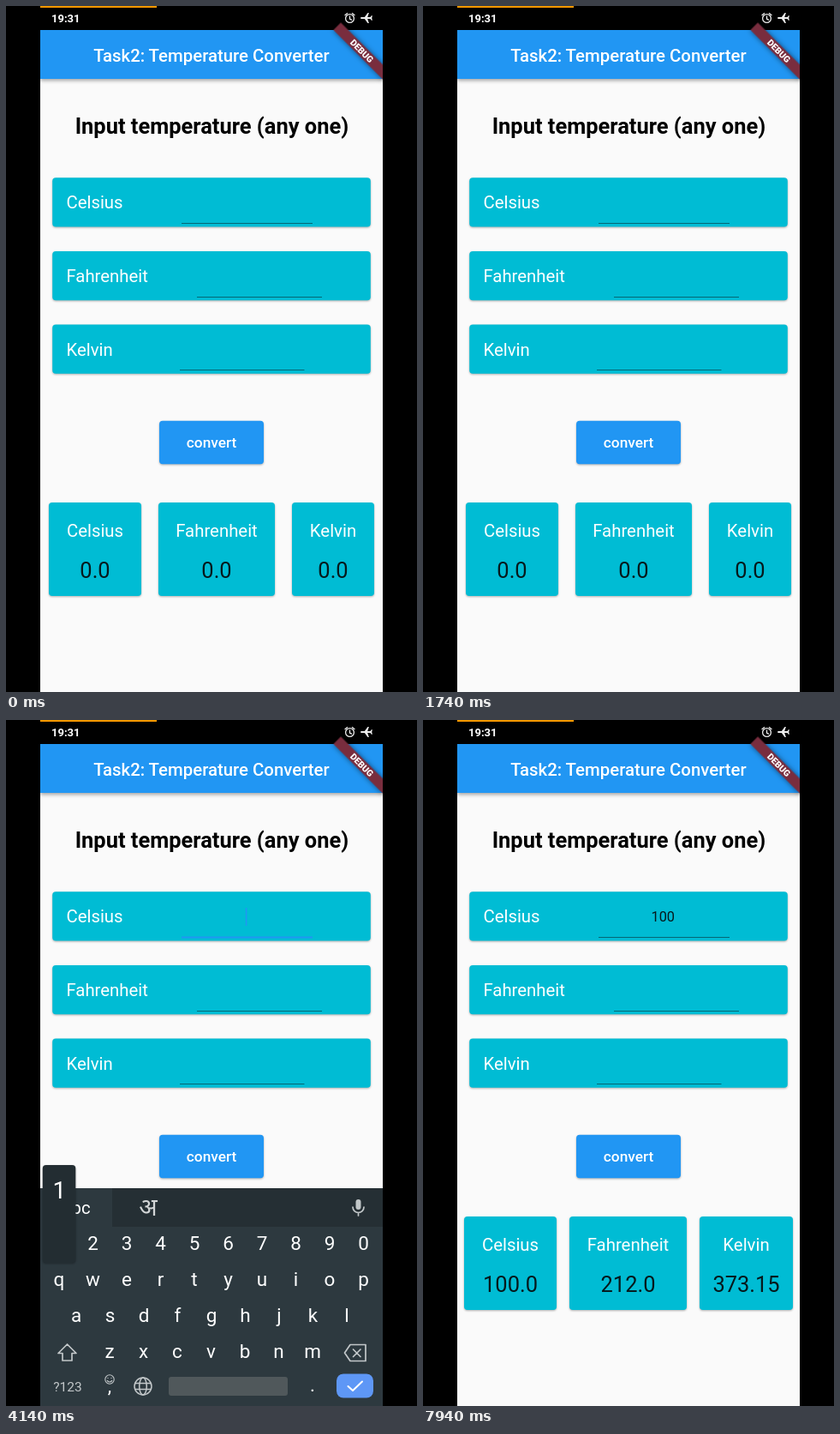
An HTML page that plays this animation: 480x800 px, repeating every 7.99 s.

```html
<!DOCTYPE html>
<html lang="en">
<head>
<meta charset="utf-8">
<title>Temperature Converter</title>
<style>
  html, body { margin: 0; width: 100%; height: 100%; overflow: hidden; background: #000; }
  svg { display: block; width: 480px; height: 800px; font-family: Roboto, sans-serif; }
  text { fill: #fff; white-space: pre; }
  .mid { text-anchor: middle; }
  .label { font-size: 20.36px; }
  .value { font-size: 25.45px; fill: #06191c; }
  .card { fill: #00bcd4; }
  .raised { filter: drop-shadow(0 1px .8px rgba(0, 0, 0, .3)); }
  .key { font-size: 22.5px; fill: #fff; text-anchor: middle; }
  .icon { fill: none; stroke: #c2c7c9; stroke-width: 1.7; stroke-linejoin: round; stroke-linecap: round; }
</style>
</head>
<body>
<svg id="stage" viewBox="0 0 480 800"></svg>
<script>
const LOOP = 7990;
const FOCUS = 2950, KEYBOARD_UP = 3040, DONE = 6250, KEYBOARD_DOWN = 6300, CONVERT = 7150;
const PRESSES = [['1', 4120], ['0', 4700], ['0', 5150]];
const HOLD = 100;
const KEY_PITCH = 39.5, KEYBOARD_HEIGHT = 254;
const BLUE = '#2196f3', UNDERLINE = '#056775';

const text = (x, y, content, cls = '', attrs = '') =>
  `<text x="${x}" y="${y}" class="${cls}" ${attrs}>${content}</text>`;
const rect = (x, y, w, h, fill, r = 0, attrs = '') =>
  `<rect x="${x}" y="${y}" width="${w}" height="${h}" rx="${r}" fill="${fill}" ${attrs}/>`;
const line = (x1, x2, y, attrs = '') =>
  `<path d="M${x1} ${y}H${x2}" stroke="${UNDERLINE}" ${attrs}/>`;
const icon = (d, attrs = '') => `<path class="icon" d="${d}" ${attrs}/>`;

function statusBar() {
  return rect(40, 0, 400, 28, '#000') + rect(40, 0, 136, 2, '#ff9800') +
    text(53, 18.7, '19:31', '', 'font-size="13" font-weight="700"') +
    `<g fill="none" stroke="#eee" stroke-width="1.3">
      <circle cx="401.5" cy="14.5" r="4.9"/>
      <path d="M401.5 11.5V15L404 16.4M395.6 11L399 8.3M407.4 11L404 8.3"/>
    </g>
    <path fill="#eee" d="M414 14q0-1.1 1.2-1.1h3.6L422.5 8h1.4l-1.7 4.9h3.3l1.3-1.6h1.1l-.7 2.7.7 2.7h-1.1l-1.3-1.6h-3.3l1.7 4.9h-1.4l-3.7-4.9h-3.6q-1.2 0-1.2-1.1z"/>`;
}

function inputRow(y, label, x1, x2, id) {
  return rect(54.2, y, 371.6, 57.2, '', 4, 'class="card raised"') +
    text(70.4, y + 36, label, 'label') +
    line(x1, x2, Math.floor(y + 53) + .5, `id="${id}"`);
}

function keyboard() {
  const row = (chars, x, y) =>
    [...chars].map((c, i) => text(x + i * KEY_PITCH, y, c, 'key')).join('');
  return rect(40, 546, 400, 260, '#2d393f') + rect(124, 546, 316, 45, '#252f34') +
    text(82, 576, 'abc', 'mid', 'font-size="20.3"') +
    text(166, 578, 'अ', 'mid', 'style="font:28px \'Noto Sans\',\'Noto Sans Devanagari\',sans-serif;fill:#d3d6d7"') +
    rect(408.5, 559, 6, 12, '#c2c7c9', 3) +
    icon('M405 568a6.5 6.5 0 0 0 13 0M411.5 575V578') +
    row('1234567890', 62, 618) + row('qwertyuiop', 62, 660) +
    row('asdfghjkl', 82, 702) + row('zxcvbnm', 121, 744) +
    icon('M71.5 728L82 738.5H77V747H66V738.5H61Z') +
    icon('M402 728.5H420V747.5H402L395.5 738ZM405.5 734L414 742.5M414 734L405.5 742.5') +
    text(72, 782.5, '?123', 'mid', 'font-size="15.5" style="fill:#c2c7c9"') +
    '<circle class="icon" cx="121" cy="769" r="5.2" style="stroke-width:1.1"/>' +
    icon('M119 767.3v.1M123 767.3v.1M118.3 770.5q2.7 3 5.4 0', 'style="stroke-width:1.2"') +
    text(121, 784, ',', 'key') +
    `<g class="icon" style="stroke-width:1.5"><circle cx="160" cy="777" r="10"/>
      <ellipse cx="160" cy="777" rx="4.3" ry="10"/><path d="M151 773.5H169M151 780.5H169"/></g>` +
    rect(190, 766, 139, 22, '#50585b', 3) +
    text(358, 783, '.', 'key') +
    rect(386, 762.5, 43, 28, '#5e97f6', 8) +
    icon('M399.5 777L405 782L416 771.5', 'style="stroke:#fff;stroke-width:2"');
}

function debugBanner() {
  return `<g clip-path="url(#phone)"><g transform="translate(440 28) rotate(45)">
    ${rect(-40.7, 28.5, 81.4, 12.2, '#792d3e', 0, 'style="filter:drop-shadow(0 0 3px rgba(0,0,0,.5))"')}
    ${text(0, 38.3, 'DEBUG', 'mid', 'font-size="10.4" font-weight="900"')}</g></g>`;
}

const resultNames = ['Celsius', 'Fahrenheit', 'Kelvin'];
// Each layout: value, card left edge, card width
const emptyResults = [['0.0', 50, 108], ['0.0', 178, 136], ['0.0', 334, 96]];
const fullResults = [['100.0', 48, 108], ['212.0', 171, 137], ['373.15', 323, 109]];
const results = (layout, id) => `<g id="${id}">` + layout.map(([value, x, w], i) =>
  rect(x, 579, w, 109, '', 4, 'class="card raised"') +
  text(x + w / 2, 619, resultNames[i], 'label mid') +
  text(x + w / 2, 667, value, 'value mid')).join('') + '</g>';

document.getElementById('stage').innerHTML =
  '<clipPath id="phone"><path d="M40 0H440V800H40Z"/></clipPath>' +
  rect(0, 0, 480, 800, '#000') + '<g clip-path="url(#phone)">' +
  rect(40, 28, 400, 772, '#fafafa') +
  rect(40, 28, 400, 57, BLUE, 0, 'style="filter:drop-shadow(0 2px 2px rgba(0,0,0,.35))"') +
  statusBar() +
  text(240, 64.5, 'Task2: Temperature Converter', 'mid', 'font-size="20.36" font-weight="500"') +
  text(240.4, 149, 'Input temperature (any one)', 'mid', 'font-size="25.45" font-weight="700" style="fill:#000"') +
  inputRow(200.2, 'Celsius', 205, 358, 'celsiusLine') +
  inputRow(286, 'Fahrenheit', 223, 369, 'fahrenheitLine') +
  inputRow(371.5, 'Kelvin', 203, 348.5, 'kelvinLine') +
  text(280.3, 234.5, '', 'mid', 'id="typed" font-size="16.3" style="fill:#06191c"') +
  rect(0, 219, 1.6, 21, BLUE, 0, 'id="caret"') +
  rect(179, 483.7, 122, 50.5, BLUE, 4, 'class="raised"') +
  text(240, 515, 'convert', 'mid', 'font-size="17.3" font-weight="500"') +
  results(emptyResults, 'before') + results(fullResults, 'after') +
  `<g id="keyboard">${keyboard()}</g>` +
  `<g id="popup">${rect(-19.5, 519, 38.5, 114, '#232d32', 4, 'class="raised"')}
    ${text(0, 558, '', 'mid', 'id="popupChar" font-size="28"')}</g></g>` +
  debugBanner();

const $ = id => document.getElementById(id);
const show = (id, visible) => $(id).setAttribute('visibility', visible ? 'visible' : 'hidden');
const progress = (t, start, length) => Math.min(1, Math.max(0, (t - start) / length));

function render(t) {
  const focused = t >= FOCUS && t < DONE;
  $('celsiusLine').setAttribute('stroke', focused ? BLUE : UNDERLINE);
  $('celsiusLine').setAttribute('stroke-width', focused ? 2 : 1);

  const rise = 1 - (1 - progress(t, KEYBOARD_UP, 270)) ** 3;
  const fall = progress(t, KEYBOARD_DOWN, 220) ** 2;
  $('keyboard').setAttribute('transform', `translate(0 ${KEYBOARD_HEIGHT * (1 - rise + fall)})`);
  show('keyboard', rise > 0 && fall < 1);

  const entered = PRESSES.filter(([, at]) => t >= at + HOLD);
  $('typed').textContent = entered.map(([c]) => c).join('');
  const lastEdit = entered.length ? entered.at(-1)[1] + HOLD : FOCUS + 100;
  show('caret', focused && t > 3300 && (t - lastEdit) % 1000 < 500);
  $('caret').setAttribute('x', 279.8 + entered.length * 4.6);

  const pressed = PRESSES.find(([, at]) => t >= at && t < at + HOLD);
  show('popup', pressed);
  if (pressed) {
    const x = pressed[0] === '1' ? 62.3 : 62 + 9 * KEY_PITCH;
    $('popup').setAttribute('transform', `translate(${x} 0)`);
    $('popupChar').textContent = pressed[0];
  }

  show('before', t < CONVERT);
  show('after', t >= CONVERT);
}

const startTime = performance.now();
function tick() {
  render((performance.now() - startTime) % LOOP);
  requestAnimationFrame(tick);
}
tick();
</script>
</body>
</html>
```
